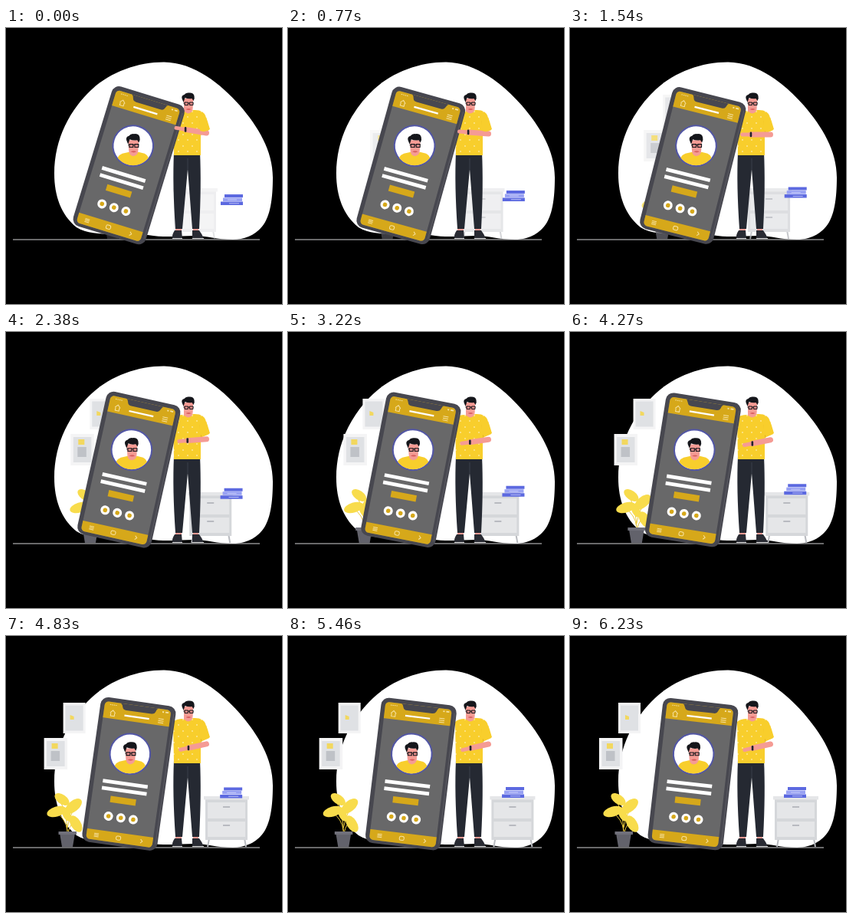
These frames come from a looping animation (360x360 px, 6.3 s). An HTML page:

```html
<!DOCTYPE html>
<html lang="en">
<head>
<meta charset="utf-8">
<style>
html, body { margin: 0; width: 100%; height: 100%; overflow: hidden; background: #000; }
svg { display: block; width: 100vw; height: 100vh; }
</style>
</head>
<body>
<svg viewBox="0 0 360 360">
  <defs>
    <clipPath id="disc"><circle r="25.5"/></clipPath>
    <clipPath id="screenShape"><rect x="-43" y="-89" width="87" height="181" rx="5"/></clipPath>
    <pattern id="dots" width="12" height="15" patternUnits="userSpaceOnUse">
      <rect width="12" height="15" fill="#f8ce2c"/>
      <circle cx="3" cy="4" r=".9" fill="#fdeaa0"/><circle cx="9" cy="11" r=".9" fill="#fdeaa0"/>
    </pattern>
    <g id="head">
      <path d="M-6-5L-5 9Q-4 14 0 14.500Q5 14 6 9L7-5Z" fill="#f59b94"/>
      <path d="M-3 9Q1 7 4 9Q1 11-3 9Z" fill="#d9605f"/>
      <path d="M-6 0L-8-5Q-9-9-5-10Q-3-13 1-12.500Q7-13 8-8.500Q9-5 7-2L5-5Q0-4-4-6Z" fill="#15161b"/>
      <path d="M-6 1H7" stroke="#15161b"/>
      <path d="M-4.500 0h4.500v3.500h-4.500zM2 0h4.500v3.500h-4.500z" fill="#e08a88" stroke="#15161b"/>
    </g>
  </defs>

  <path fill="#fff" d="M63 190C63 144 84 106 112 80C137 57 172 44.500 206 44.500C246 45 280 73 305 101C329 129 348 160 348 195C348 222 345 246 334 259C324 271 310 276 296 276C275 276 262 271 245 271C225 271 210 274 185 270C150 266 115 274 92 260C72 244 63 219 63 190Z"/>
  <path d="M9 276H331" stroke="#d3d3d5"/>

  <g id="pictures">
    <path fill="#f4f4f5" d="M63 87h29v40h-29zM38 133h30.500v41h-30.500z"/>
    <path fill="#dfe1e4" d="M66 90.500h23v33h-23zM41.500 137h23.500v33h-23.500z"/>
    <path fill="#f2d85f" d="M72 103l5 2v4h-5zM48 140h8v7h-8z"/>
    <path fill="#bfc2c7" d="M47 150h11.500v13h-11.500z"/>
  </g>

  <g id="plant">
    <path d="M70 257Q70 232 60 214M70 254Q68 238 55 230M70 250Q74 231 82 220M71 256Q74 243 82 241" fill="none" stroke="#e9c93c"/>
    <g fill="#f8dc4c">
      <ellipse rx="13" ry="6.500" transform="translate(56 229)rotate(-17)"/>
      <ellipse rx="11" ry="6" transform="translate(63 213)rotate(35)"/>
      <ellipse rx="13" ry="7" transform="translate(78 222)rotate(-40)"/>
      <ellipse rx="12" ry="6.500" transform="translate(81 245)rotate(58)"/>
      <ellipse rx="9" ry="5" transform="translate(69 233)rotate(65)"/>
    </g>
    <path d="M60 257H80L77 275H63Z" fill="#62626b"/>
    <path d="M58.500 255H82V259H58.500Z" fill="#70707a"/>
  </g>

  <g id="cabinet">
    <path d="M272 264L270 275M318 264L320 275" stroke="#b9bbc0" stroke-width="2"/>
    <path d="M267 213H322V266H267Z" fill="#d5d7da"/>
    <path d="M265 209H324V213.500H265Z" fill="#e5e6e8"/>
    <path d="M270 217H319V238H270ZM270 242H319V262H270Z" fill="#e5e6e8"/>
    <path d="M290 223h9M290 247h9" stroke="#a9acb3" stroke-width="1.500"/>
  </g>
  <g id="books">
    <path d="M284 197h24v4h-24zM279 206.500h29v4.500h-29z" fill="#5c69e0"/>
    <path d="M282 201.500h25v4.500h-25z" fill="#98a1f3"/>
    <path d="M288 204h12M290 208.800h13" stroke="#d5d9fa" stroke-width=".8"/>
  </g>

  <g id="person">
    <path d="M221 258h8v9h-8zM244 258h7v9h-7z" fill="#f59b94"/>
    <path d="M219 162H253Q255 205 252 262H243L237 184L230 262H221Q217 205 219 162Z" fill="#252932"/>
    <path d="M237 170L237 184" stroke="#3b404b"/>
    <path d="M220 264H229L230 275H217Q216 270 220 264ZM243 264H252Q256 269 258 275H243Z" fill="#292b33"/>
    <path d="M217 274.500h13M243 274.500h15" stroke="#ddd"/>
    <path d="M232 102H243V112H232Z" fill="#f59b94"/>
    <path d="M231 108Q237 113 244 107Q258 106 261 116L265 133L254 138V166H219L218 112Q222 108 231 108Z" fill="url(#dots)"/>
    <path d="M253 121L255 140" stroke="#dda91c" stroke-width=".8"/>
    <use href="#head" transform="translate(237.500 97)"/>
  </g>

  <g id="phone">
    <rect x="-48.500" y="-94.500" width="99" height="190.500" rx="10" fill="#47474f"/>
    <path d="M48-85V87" stroke="#55555d" stroke-width="1.500"/>
    <g clip-path="url(#screenShape)">
      <path d="M-44-90H45V93H-44Z" fill="#686869"/>
      <path d="M-44-90H45V-67.500H-44ZM-44 78.500H45V93H-44Z" fill="#d6a81a"/>
      <path d="M-23-90H28Q25-88 24-84Q23-81 19-81H-14Q-18-81-19-84Q-20-88-23-90Z" fill="#47474f"/>
    </g>
    <g fill="none" stroke="#f7e3a4">
      <path d="M-34.500-75l3.500-3.500l3.500 3.500M-33.500-75v4h5v-4M29-76h7M29-73.500h7M29-71h7"/>
      <path d="M-36-85.500h9" stroke-dasharray="1.500 1"/><path d="M33-85.500h2M37-85.500h4" stroke-width="1.800"/>
      <path d="M-33 83.500h6M-33 85.500h6M-33 87.500h6M28 83l2.500 2.500l-2.500 2.500"/>
      <rect x="-4" y="83" width="6" height="5" rx="2"/>
    </g>
    <path d="M-15.500-74H17" stroke="#fff" stroke-width="2.200"/>
    <path d="M-31.500 14H27.500M-31.500 23.500H27.500" stroke="#fff" stroke-width="4.800"/>
    <rect x="-18.500" y="32.300" width="33.500" height="8.400" fill="#d6a81a"/>
    <g fill="#fff"><circle cx="-17.800" cy="59" r="6"/><circle cx="-1.500" cy="59" r="6"/><circle cx="14.800" cy="59" r="6"/></g>
    <g fill="#d6a81a"><circle cx="-17.800" cy="59" r="2.800"/><circle cx="-1.500" cy="59" r="2.800"/><circle cx="14.800" cy="59" r="2.800"/></g>
    <g transform="translate(-1.200 -25.300)">
      <circle r="26.300" fill="#fff" stroke="#5256a6" stroke-width="2"/>
      <g id="avatar"><g clip-path="url(#disc)">
        <path d="M-4 4H6V15H-4Z" fill="#f59b94"/>
        <path d="M-23 30Q-23 13-14 10L-5 8Q1 14 7 8L15 10Q22 13 23 30Z" fill="#f8ce2c"/>
        <use href="#head" transform="translate(0 -2)scale(1.080)"/>
      </g></g>
    </g>
  </g>

  <g fill="none" stroke-linecap="round">
    <path id="forearm" stroke="#f59b94" stroke-width="7"/>
    <path id="hand" stroke="#f59b94" stroke-width="5"/>
    <path id="watch" stroke="#20232b" stroke-width="2.600"/>
  </g>
  <path d="M252 114Q261 112 263 122L266 132Q260 137 253 134Z" fill="#f8ce2c"/>
</svg>
<script>
const LOOP = 6300, STEP = 70, TRAVEL = 5650;
const el = id => document.getElementById(id);
const set = (id, name, value) => el(id).setAttribute(name, value);
const mix = (a, b, k) => a + (b - a) * k;
const slide = (id, x, y = 0) => set(id, 'transform', `translate(${x} ${y})`);

function draw(time) {
  const u = Math.min(1, time / TRAVEL);
  const eased = 1 - (1 - u) ** 2;
  const angle = mix(17, 6.5, u);
  set('phone', 'transform', `translate(159.5 ${mix(178.2, 179.2, u)}) rotate(${angle})`);
  set('avatar', 'transform', `rotate(${-angle})`);

  slide('pictures', mix(80, 0, u));
  slide('plant', mix(69, 0, u));
  slide('cabinet', mix(-48, 0, u));
  slide('books', mix(1, 0, u), mix(20, 0, eased));
  const fade = Math.min(1, 0.4 + 1.5 * u);
  for (const id of ['pictures', 'plant', 'cabinet']) set(id, 'opacity', fade);

  // The forearm swings from the phone edge down to the waist.
  const elbow = [261.5, mix(137, 141, eased)];
  const tip = [mix(220, 226, eased), mix(130, 149, eased)];
  const at = k => [mix(elbow[0], tip[0], k), mix(elbow[1], tip[1], k)];
  const wrist = at(0.66);
  set('forearm', 'd', `M${elbow}L${wrist}`);
  set('hand', 'd', `M${wrist}L${at(0.95)}`);
  set('watch', 'd', `M${wrist[0]} ${wrist[1] - 2}v4`);
}

function tick() {
  const time = performance.now() % LOOP;
  draw(Math.floor(time / STEP) * STEP);
  requestAnimationFrame(tick);
}
tick();
</script>
</body>
</html>
```
